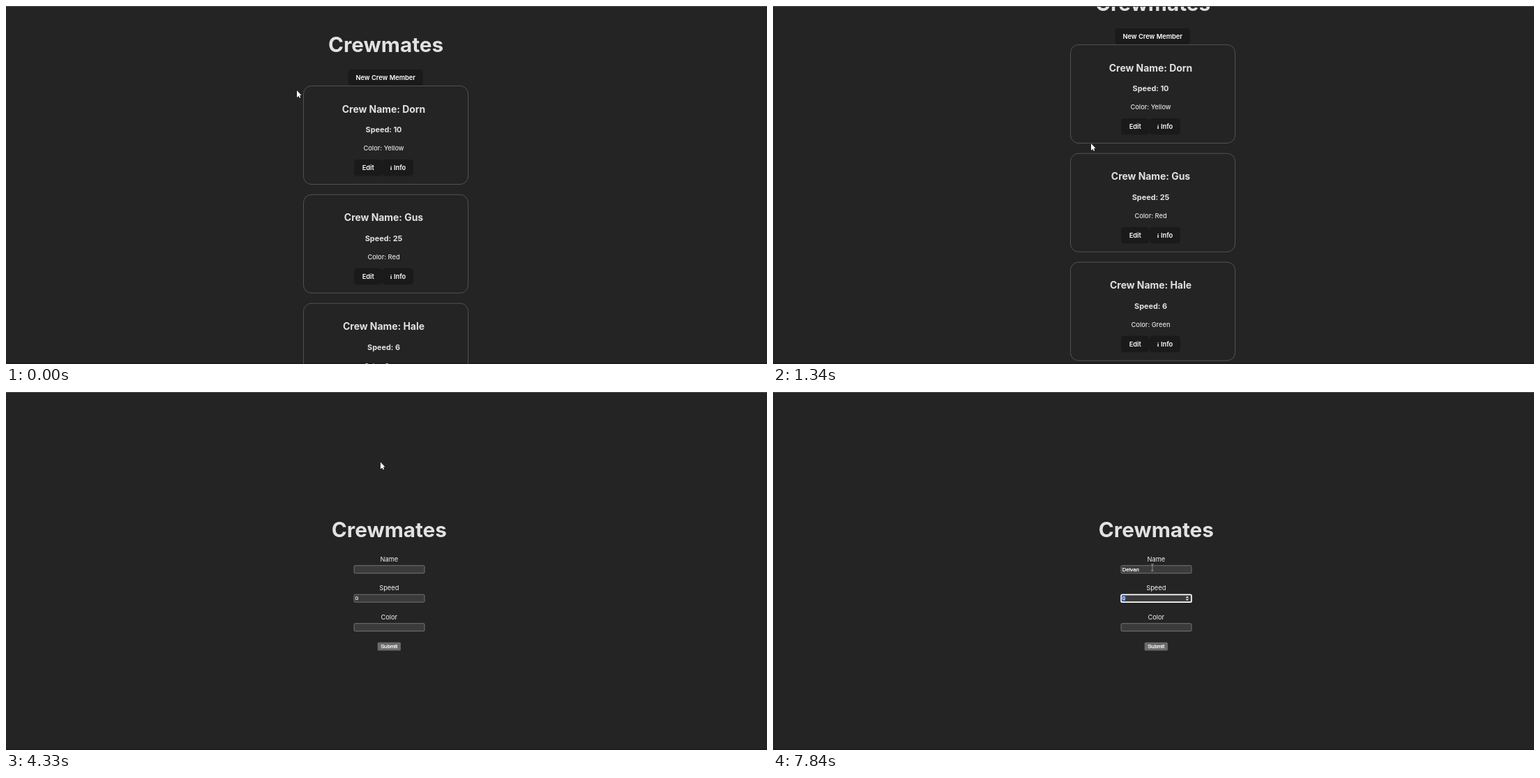
These frames come from a looping animation (1091x513 px, 8000 ms). An HTML page with a canvas:

```html
<!DOCTYPE html>
<html lang="en">
<head>
<meta charset="utf-8">
<title>Crewmates</title>
<style>
  html, body { margin: 0; width: 100%; height: 100%; overflow: hidden; background: #242424; }
  canvas { display: block; }
</style>
</head>
<body>
<canvas id="stage" width="1091" height="513"></canvas>
<script>
const ctx = document.getElementById('stage').getContext('2d');
const LOOP = 8000, W = 1091, H = 513;
const REM = 9.28, INK = '#e2e2e2', DARK = '#1a1a1a';
const INTER = 'Inter, sans-serif', ARIAL = '"Liberation Sans", Arial, sans-serif';
const FORM_AT = 3810, FOCUS_AT = 5080, TYPE_AT = 6750, TAB_AT = 7840;

const crew = [
  { name: 'Dorn', speed: 10, color: 'Yellow' },
  { name: 'Gus', speed: 25, color: 'Red' },
  { name: 'Hale', speed: 6, color: 'Green' }
];
const newName = 'Delvan';

// Smooth progress from 0 to 1 between two times
function ease(t, from, to) {
  const p = Math.max(0, Math.min(1, (t - from) / (to - from)));
  return p * p * (3 - 2 * p);
}

// One wheel notch down, one back up
const scrollAt = t => 59 * (ease(t, 591, 771) - ease(t, 1400, 1600));

function pointerAt(t) {
  let x = 417, y = 121;
  const move = (from, to, dx, dy) => {
    const p = ease(t, from, to);
    x += dx * p;
    y += dy * p;
  };
  move(370, 690, 7, 0);
  move(690, 1280, 32, 76);
  move(1400, 1720, 0, -26);
  // Elliptic sweep across the first card
  const a0 = 0.35, a = a0 + 4.65 * ease(t, 2050, 2860);
  x += 73 * (Math.cos(a0) - Math.cos(a));
  y += 38 * (Math.sin(a) - Math.sin(a0));
  move(2890, 3220, 33, -21);
  move(4330, 4730, 7, 157);
  move(5230, 5280, 0, -6);
  return [x, y];
}

// y is the middle of the capital letters
function text(str, x, y, size = REM, weight = 400, color = INK, family = INTER) {
  ctx.font = `${weight} ${size}px ${family}`;
  ctx.textAlign = 'center';
  ctx.fillStyle = color;
  ctx.fillText(str, x, y + size * 0.3635);
}

// Form control text, slightly thickened
function controlText(str, x, y, align = 'left') {
  ctx.font = `7.73px ${ARIAL}`;
  ctx.textAlign = align;
  ctx.fillStyle = ctx.strokeStyle = '#fff';
  ctx.lineWidth = 0.25;
  ctx.fillText(str, x, y + 2.8);
  ctx.strokeText(str, x, y + 2.8);
}

function box(x, y, w, h, r, fill, stroke, line = 1) {
  ctx.beginPath();
  ctx.roundRect(x, y, w, h, r);
  if (fill) { ctx.fillStyle = fill; ctx.fill(); }
  if (stroke) { ctx.strokeStyle = stroke; ctx.lineWidth = line; ctx.stroke(); }
}

function button(label, x, y, w, labelX = x + w / 2) {
  box(x, y, w, 23.5, 4.6, DARK);
  text(label, labelX, y + 11.8, REM, 600, '#fff');
}

function card({ name, speed, color }, y) {
  box(426.5, y + 0.5, 236, 141, 11.5, null, '#525252');
  text('Crew Name: ' + name, 541.5, y + 33.5, 1.5 * REM, 700);
  text('Speed: ' + speed, 541.5, y + 63.5, 1.17 * REM, 700);
  text('Color: ' + color, 541.5, y + 90, REM, 450);
  button('Edit', 499, y + 106, 40.5);
  button('Info', 539.5, y + 106, 44.5, 564.6);
  text('i', 552, y + 117.8, REM, 700, '#fff', '"Liberation Serif", serif');
}

function listPage(t) {
  ctx.save();
  ctx.translate(0, -scrollAt(t));
  text('Crewmates', 544.5, 55, 3.2 * REM, 700);
  button('New Crew Member', 490.5, 91, 107.5);
  const hover = 0.65 * ease(t, 2980, 3220);
  box(491, 91.5, 106.7, 22.7, 4.4, null, `rgba(100,108,255,${hover})`);
  crew.forEach((member, i) => card(member, 114 + i * 155.8));
  ctx.restore();
}

function field(label, y, focused) {
  text(label, 549.3, y - 14.5, REM, 400, '#f4f4f4');
  if (focused) box(499.1, y - 5.2, 100.8, 10.9, 1.8, '#3b3b3b', '#fff', 1.7);
  else box(499, y - 5.3, 101, 11, 1.5, '#3b3b3b', '#858585', 0.8);
}

function spinner(x, y) {
  ctx.fillStyle = '#e8e8e8';
  for (const side of [-1, 1]) {
    ctx.beginPath();
    ctx.moveTo(x - 2.2, y + side * 0.7);
    ctx.lineTo(x, y + side * 3.3);
    ctx.lineTo(x + 2.2, y + side * 0.7);
    ctx.fill();
  }
}

function formPage(t) {
  const tabbed = t >= TAB_AT, inName = t >= FOCUS_AT && !tabbed;
  text('Crewmates', 549.4, 197, 3.2 * REM, 700);
  field('Name', 254, inName);
  field('Speed', 295.5, tabbed);
  field('Color', 337, false);

  const typing = t >= TYPE_AT;
  const value = typing ? newName.slice(0, 1 + Math.floor((t - TYPE_AT) / 158)) : '';
  controlText(value, 500.7, 254);
  const blinkOn = typing || (t - FOCUS_AT) % 1000 < 500;
  if (inName && blinkOn) ctx.fillRect(501 + ctx.measureText(value).width, 250, 0.7, 8.6);

  if (tabbed) {
    box(500.6, 291.3, 4.4, 8.6, 0, '#1e5fd0');
    spinner(593.8, 295.7);
  }
  controlText('0', 500.7, 295.5);
  box(532.7, 358.7, 33.2, 11.8, 1.5, '#6b6b6b');
  controlText('Submit', 549.2, 364.6, 'center');
}

// Outlined white pointer from an SVG path
function icon(path) {
  const p = new Path2D(path);
  ctx.strokeStyle = '#111';
  ctx.lineWidth = 1;
  ctx.stroke(p);
  ctx.fillStyle = '#fff';
  ctx.fill(p);
}

const arrow = () => icon('M0 0V10L2.4 8 4 11 5.2 10 4 7H6.6Z');
const hand = () => icon('M-.8 1Q.4-.4 1.4 1V4L5.4 6V9L4 12H-.8L-3.2 8-.8 7.6Z');

function beam() {
  ctx.strokeStyle = '#aaa';
  ctx.lineWidth = 0.8;
  ctx.stroke(new Path2D('M-2-4.6H2M0-4.6V4.6M-2 4.6H2'));
}

function cursor(t) {
  const [x, y] = pointerAt(t);
  ctx.save();
  ctx.translate(x, y);
  if (y > 247) beam();
  else if (t > 2980 && t < 3980) hand();
  else arrow();
  ctx.restore();
}

function draw(t) {
  box(0, 0, W, H, 0, '#242424');
  box(0, H - 2, W, 2, 0, '#1e1e1e');
  if (t < FORM_AT) listPage(t);
  else formPage(t);
  box(0, 0, W, 1, 0, '#505050');
  cursor(t);
}

const start = performance.now();
function tick() {
  draw((performance.now() - start) % LOOP);
  requestAnimationFrame(tick);
}
tick();
</script>
</body>
</html>
```
